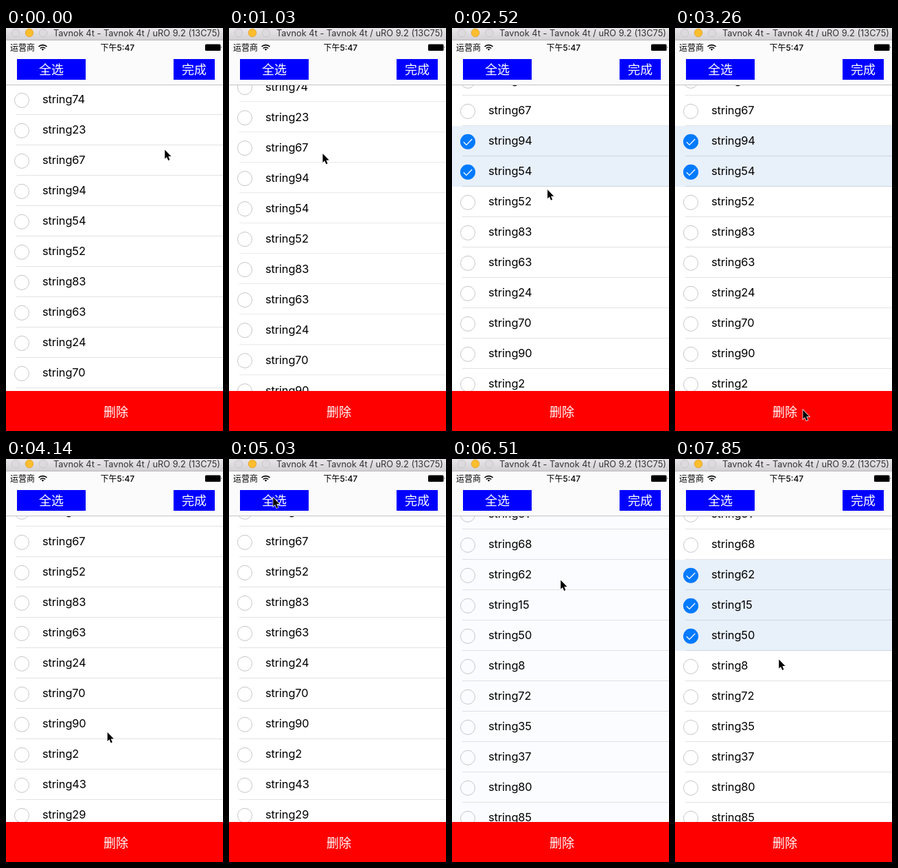
An HTML page that plays this animation: 316x584 px, repeating every 8 s.

```html
<!DOCTYPE html>
<html lang="zh">
<head>
<meta charset="utf-8">
<style>
  html, body { margin: 0; width: 100%; height: 100%; overflow: hidden; background: #fff; }
  svg { display: block; width: 316px; height: 584px; font-family: Inter, "Noto Sans CJK SC", sans-serif; }
  .row text { font-size: 16.4px; letter-spacing: -.12px; }
  .ring { fill: none; stroke: #c7c7cc; }
  .sep { fill: #3c3c43; opacity: .15; }
  .button { fill: #fff; font-size: 18px; font-weight: 300; text-anchor: middle; }
  .status { font-size: 12px; }
</style>
</head>
<body>
<svg viewBox="0 0 316 584">
  <defs>
    <linearGradient id="bar" x2="0" y2="1">
      <stop stop-color="#e8e6e8"/><stop offset="1" stop-color="#d2d0d2"/>
    </linearGradient>
    <clipPath id="view"><rect y="82" width="316" height="444"/></clipPath>
  </defs>
  <rect width="316" height="584" fill="#fff"/>
  <g id="list" clip-path="url(#view)"></g>

  <rect id="head" y="18" width="316" height="64"/>
  <rect y="82" width="316" height="1" fill="#c4c4c6"/>
  <rect width="316" height="18" fill="url(#bar)"/>
  <rect y="17" width="316" height="1" fill="#b9b7b9"/>
  <g fill="#dcdadc" stroke="#c4c2c4" stroke-width=".8">
    <circle cx="14" cy="7" r="5.8"/>
    <circle cx="34" cy="7" r="5.8" fill="#fdbd2e" stroke="#e0a028"/>
    <circle cx="54" cy="7" r="5.8"/>
  </g>
  <text x="69" y="12" font-size="12.8" fill="#333">Tavnok 4t - Tavnok 4t / uRO 9.2 (13C75)</text>

  <text class="status" x="6" y="32.5">运营商</text>
  <g fill="none" stroke="#000" stroke-width="1.7">
    <path d="M47.5 27a8.6 8.6 0 0 1 12 0M49.8 29.5a5.3 5.3 0 0 1 7.4 0"/>
    <path d="M51.7 30.8a2.6 2.6 0 0 1 3.6 0L53.5 32.8z" fill="#000" stroke="none"/>
  </g>
  <text class="status" x="137.5" y="32.5" font-weight="500">下午5:47</text>
  <rect x="290" y="23.5" width="22.5" height="9.5" rx="1.5"/>
  <path d="M313.6 26.5q1.4 1.5 0 3z"/>

  <path d="M16 45h100v30H16zM244 45h60v30h-60z" fill="#00f"/>
  <rect y="526" width="316" height="58" fill="#f00"/>
  <text class="button" x="66" y="66.5">全选</text>
  <text class="button" x="274" y="66.5">完成</text>
  <text class="button" x="160" y="562.5">删除</text>

  <path id="cursor" d="M.3.6V13.6L3.1 10.9 5.3 16 7.4 15.1 5.3 10.1H9.5Z"
    stroke="#fff" stroke-width="1.4" paint-order="stroke"/>
</svg>
<script>
const $ = id => document.getElementById(id);
const STEP = 148, LOOP = 8000, ROW = 44, TOP = 82;

// row labels; the four in the middle only fly past
const passing = Array.from({ length: 4 }, (_, i) => 58 + i * 53 % 41);
const values = [74, 23, 67, 94, 54, 52, 83, 63, 24, 70, 90, 2, 43, 29,
  ...passing, 81, 68, 62, 15, 50, 8, 72, 35, 37, 80, 85];

// step at which a single row gets ticked
const ticked = { 94: 14, 54: 16, 62: 46, 15: 48, 50: 51 };
const deleted = [94, 54];

// cursor stops: step, x, y
const path = [[0, 231, 176], [5, 138, 200], [11, 131, 128], [16, 135, 208], [22, 186, 553],
  [25, 186, 553], [33, 64, 55], [39, 64, 57], [43, 64, 57], [44, 158, 175], [53, 151, 290]];

function ramp(k, from, to) {
  const u = Math.max(0, Math.min(1, (k - from) / (to - from)));
  return u * u * (3 - 2 * u);
}

$('list').innerHTML = values.map(v => `<g class="row">
  <rect class="back" width="316" height="44"/>
  <rect class="sep" x="15" y="43" width="301" height="1"/>
  <circle class="ring" cx="23" cy="22.8" r="10.5"/>
  <g class="tick"><circle cx="23" cy="22.8" r="11" fill="#007aff"/>
    <path d="M16.8 23.2l4.2 4.2 8.2-8.4" fill="none" stroke="#fff" stroke-width="1.3"/></g>
  <text x="53" y="27.2">string${v}</text></g>`).join('');

const rows = [...document.querySelectorAll('.row')].map((el, i) => ({
  el, value: values[i], back: el.querySelector('.back'), tick: el.querySelector('.tick')
}));

function cursorAt(k) {
  const i = Math.max(1, path.findIndex(p => p[0] >= k));
  const [[k0, x0, y0], [k1, x1, y1]] = path.slice(i - 1, i + 1);
  const u = ramp(k, k0, k1);
  return [x0 + (x1 - x0) * u, y0 + (y1 - y0) * u];
}

function draw(k) {
  const all = k >= 35 && k < 44;
  const gone = ramp(k, 23, 26);
  let y = TOP - 72 * ramp(k, 5, 11) - 612 * ramp(k, 34, 37);
  for (const { el, value, back, tick } of rows) {
    const left = deleted.includes(value) ? 1 - gone : 1;
    const own = k >= ticked[value];
    el.setAttribute('transform', `translate(0 ${y})`);
    el.setAttribute('opacity', left);
    back.setAttribute('fill', all || own ? '#e8f0fa' : k === 44 ? '#fbfcff' : '#fff');
    tick.setAttribute('visibility', own || all && k < 42 ? 'visible' : 'hidden');
    y += ROW * left;
  }
  $('head').setAttribute('fill', all ? '#f5f6fa' : '#fbfbfb');
  $('cursor').setAttribute('transform', `translate(${cursorAt(k)})`);
}

const start = performance.now();
function frame() {
  const t = (performance.now() - start) % LOOP;
  draw(Math.min(53, Math.floor((t + 8) / STEP)));
  requestAnimationFrame(frame);
}
frame();
</script>
</body>
</html>
```
